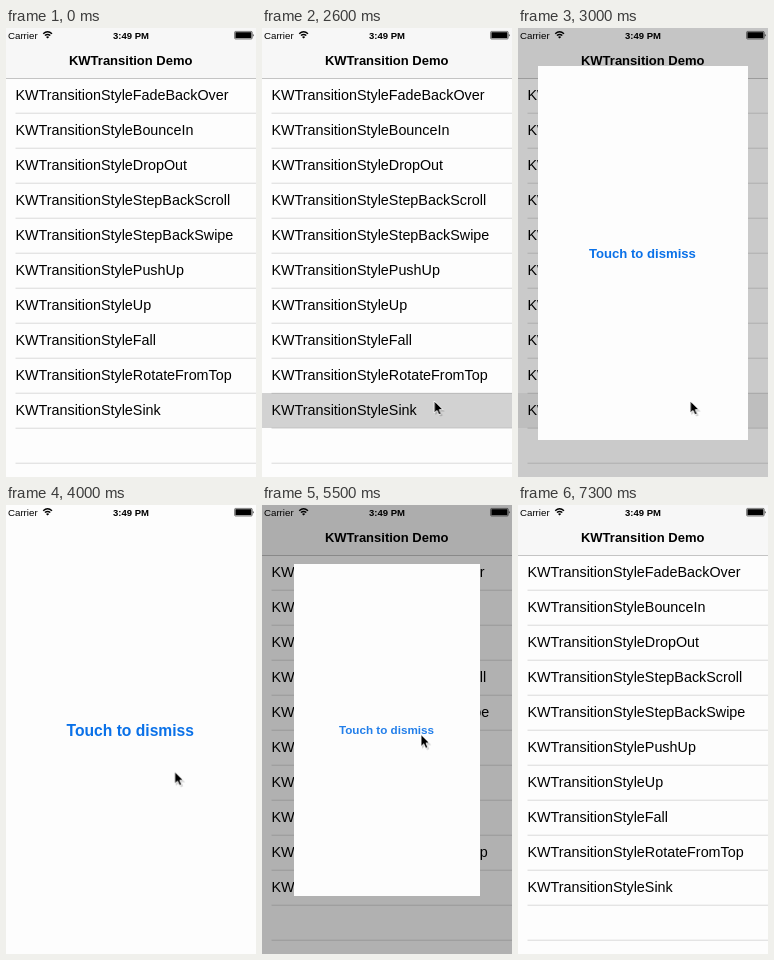
An HTML page for the animation above (7900 ms loop, 250x449 px).

```html
<!DOCTYPE html>
<html lang="en">
<head>
<meta charset="utf-8">
<title>KWTransition Demo</title>
<style>
  html, body { margin: 0; width: 100%; height: 100%; overflow: hidden; background: #fdfdfd; }
  svg { display: block; width: 250px; height: 449px; }
  text { font-family: "Liberation Sans", Arial, sans-serif; fill: #000; }
  .row { font-size: 14.35px; }
  .title { font: bold 13px "Liberation Sans", Arial, sans-serif; }
  .label { font: bold 15.65px "Liberation Sans", Arial, sans-serif; fill: #0a71e8; }
  .carrier { font-size: 9.7px; }
  .clock { font: bold 9.5px "Liberation Sans", Arial, sans-serif; }
  .mid { text-anchor: middle; }
  #card { transform-origin: 125px 225px; }
</style>
</head>
<body>
<svg viewBox="0 0 250 449">
  <rect width="250" height="449" fill="#fdfdfd"/>
  <rect id="pick" y="365" width="250" height="35" fill="#d2d2d2"/>
  <g id="list"></g>
  <rect width="250" height="50" fill="#f7f7f7"/>
  <rect y="50" width="250" height="1" fill="#c4c4c4"/>
  <text class="title mid" x="124.7" y="37.1">KWTransition Demo</text>
  <rect id="dim" width="250" height="449"/>
  <g id="card">
    <rect width="250" height="450" fill="#fdfdfd"/>
    <text id="label" class="label mid" x="124.3" y="231">Touch to dismiss</text>
  </g>
  <g id="status">
    <text class="carrier" x="2" y="10.5">Carrier</text>
    <g fill="none" stroke="#000" stroke-width="1.4">
      <path d="M37.2 5.7Q41.6 1.7 46 5.7"/>
      <path d="M38.9 7.6Q41.6 5.2 44.3 7.6"/>
    </g>
    <path d="M40 8.9Q41.6 7.6 43.2 8.9L41.6 10.6Z"/>
    <text class="clock mid" x="125" y="10.5">3:49 PM</text>
    <rect x="228.6" y="3.4" width="17.6" height="7.6" rx="1" fill="none" stroke="#000" stroke-width=".5"/>
    <rect x="229.4" y="4.2" width="16" height="6"/>
    <path d="M246.9 5.8Q248.5 7.2 246.9 8.7Z"/>
  </g>
  <g id="cursor">
    <path d="M1 1.5V14L4 11.4L6 15.6L8.4 14.6L6.6 10.5H10.4Z" fill="#000" opacity=".18"/>
    <path d="M0 0V12L2.8 9.5L4.7 13.8L6.9 12.8L5 8.7H8.7Z" fill="#000" stroke="#fff" stroke-width=".9"/>
  </g>
</svg>
<script>
const LOOP = 7900, TICK = 100;
const byId = id => document.getElementById(id);

const styles = ['FadeBackOver', 'BounceIn', 'DropOut', 'StepBackScroll', 'StepBackSwipe',
  'PushUp', 'Up', 'Fall', 'RotateFromTop', 'Sink'];
let rows = '';
for (let i = 0; i < 11; i++) {
  const y = 50 + 35 * i;
  if (styles[i]) rows += `<text class="row" x="9.4" y="${y + 22.3}">KWTransitionStyle${styles[i]}</text>`;
  rows += `<rect x="9.5" y="${y + 34.7}" width="240.5" height="1" fill="#000" opacity=".14"/>`;
}
byId('list').innerHTML = rows;

const span = (t, from, to) => Math.min(1, Math.max(0, (t - from) / (to - from)));
const smooth = p => p * p * (3 - 2 * p);
const out = (p, power) => 1 - (1 - p) ** power;
const early = p => smooth(out(p, 1.5));   // smooth, with a longer tail

// Samples a rule once per tick and holds each value until the next.
function animate(id, rule) {
  const ticks = LOOP / TICK;
  const frames = Array.from({ length: ticks + 1 }, (_, i) =>
    ({ offset: i / ticks, easing: 'steps(1, end)', ...rule(i * TICK) }));
  byId(id).animate(frames, { duration: LOOP, iterations: Infinity });
}

animate('cursor', t => {
  const down = span(t, 1600, 2400), up = span(t, 3600, 4370);
  const x = 181 - 8.7 * out(down, 3) - 13.3 * up * up;
  const y = 237 + 136 * out(down, 1.4) - 143.5 * early(up);
  return { transform: `translate(${x}px, ${y}px)`, opacity: t >= 1600 && t < 7000 ? 1 : 0 };
});

animate('pick', t => ({ opacity: t < 2500 ? 0 : 1 - span(t, 2800, 3100) }));

animate('dim', t => ({
  opacity: .45 * (span(t, 2705, 3350) - span(t, 5100, 5800) ** 2)
}));

// The sheet rises small and grows to fill the stage, then shrinks and sinks.
animate('card', t => {
  const size = early(span(t, 2730, 3500)) - smooth(span(t, 5050, 5650));
  const rise = smooth(span(t, 2725, 3000)) - smooth(span(t, 5500, 5800));
  const s = .7 + .3 * size;
  return { transform: `translate(0px, ${445 * (1 - rise)}px) scale(${s}, ${s ** 1.05})` };
});

animate('label', t => ({ opacity: 1 - .1 * span(t, 5000, 5500) }));
</script>
</body>
</html>
```
